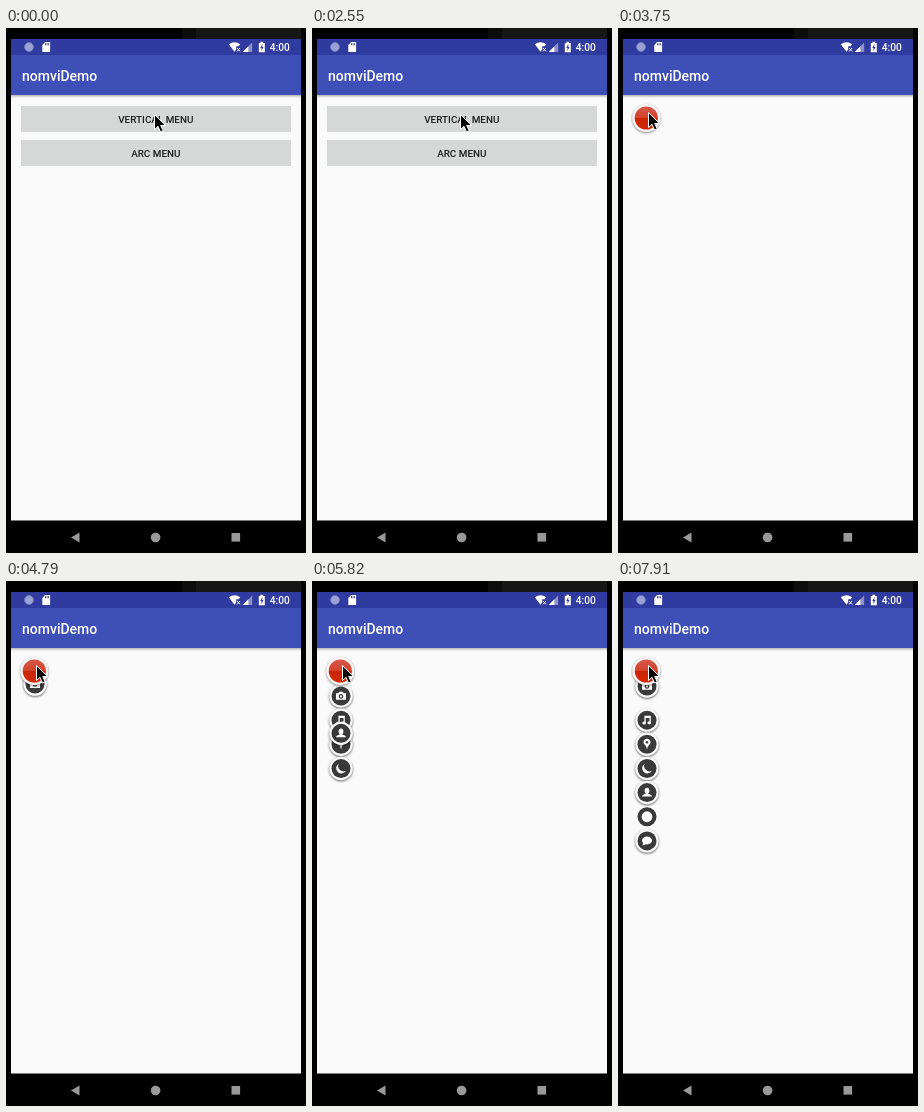
Write an HTML page that moves like this. It is 300 px wide and 525 px high and loops after 8000 ms.

```html
<!DOCTYPE html>
<html lang="en">
<head>
<meta charset="utf-8">
<title>Menu demo</title>
<style>
html, body { margin: 0; width: 100%; height: 100%; overflow: hidden; background: #000; }
svg { display: block; width: 300px; height: 525px; }
text { font: 500 9.9px Roboto, Arial, sans-serif; }
.btn { fill: #d6d7d7; filter: drop-shadow(0 .8px .7px #0006); }
.raised { filter: drop-shadow(0 1px 1px #0007); }
.item { filter: drop-shadow(0 1px 1.2px #0009); }
</style>
</head>
<body>
<svg viewBox="0 0 300 525">
  <defs>
    <linearGradient id="red" x2="0" y2="1">
      <stop offset="0" stop-color="#d6584b"/>
      <stop offset=".48" stop-color="#d2432c"/>
      <stop offset=".52" stop-color="#c92605"/>
      <stop offset="1" stop-color="#d32a08"/>
    </linearGradient>
    <linearGradient id="shade" x2="0" y2="1">
      <stop offset="0" stop-opacity=".28"/>
      <stop offset="1" stop-opacity="0"/>
    </linearGradient>
    <clipPath id="screen"><path d="M5 11h290v514H5z"/></clipPath>
  </defs>

  <path fill="#0c0c0c" d="M176 0h14v11h-14z"/>
  <path fill="#161616" d="M190 0h105v11H190z"/>

  <g fill="#999">
    <path d="M65 509.5l8.5-5v10z"/>
    <circle cx="149.6" cy="509.5" r="4.8"/>
    <path d="M225.5 505h8.6v8.6h-8.6z"/>
  </g>

  <g clip-path="url(#screen)">
    <path fill="#303b9f" d="M5 11h290v24H5z"/>
    <g id="page">
      <path id="paper" fill="#fafafa" d="M5 67h290v425.5H5z"/>
      <path fill="#3f4fb8" d="M5 27h290v40H5z"/>
      <path fill="url(#shade)" d="M5 67h290v3H5z"/>
      <text x="16" y="53" fill="#fff" style="font-size:14px">nomviDemo</text>

      <g id="home" text-anchor="middle" fill="#1d1d1d">
        <rect id="press" class="btn" x="15" y="78" width="270" height="26" rx="1.4"/>
        <rect class="btn" x="15" y="112" width="270" height="26" rx="1.4"/>
        <text x="149.8" y="95">VERTICAL MENU</text>
        <text x="149.8" y="129">ARC MENU</text>
      </g>

      <g id="menu">
        <g id="items"></g>
        <g class="raised">
          <circle cx="28.3" cy="90" r="14" fill="#f8f4f3"/>
          <circle cx="28.3" cy="90" r="11.6" fill="url(#red)"/>
        </g>
      </g>
    </g>

    <g fill="#fff">
      <circle cx="23" cy="19" r="4.4" fill="#9aa3d6" stroke="#7480c4"/>
      <path d="M36.3 17l2.8-2.9h5V24h-7.8z"/>
      <path fill="#303b9f" d="M39 15.3h.9v2H39zM40.6 15.3h.9v2h-.9zM42.2 15.3h.9v2h-.9z"/>
      <path d="M222.8 16.2q5.7-4 11.4 0l-1.6 2.1h-2.4v3l-1.7 2.4z"/>
      <path d="M231 20l3 3.4M234 20l-3 3.4" stroke="#fff"/>
      <path opacity=".45" d="M236.8 24l9.4-9.6V24z"/>
      <path d="M236.8 24l5.6-5.7V24z"/>
      <path d="M252.8 15h1.7v-1.2h2.6V15h1.7v9.2h-6z"/>
      <path fill="#303b9f" d="M256.3 16l-2 4h1.2v3l2-4h-1.2z"/>
      <text x="263.8" y="23" style="font-size:10.2px">4:00</text>
    </g>
  </g>

  <path id="cursor" stroke="#fff" stroke-width="1" d="M0 0v15l3.5-3.2 2.5 5.7 2.7-1.2-2.5-5.3h4.9z"/>
</svg>

<script>
const $ = id => document.getElementById(id);
const LOOP = 8000, TOP = 90, FIRST = 115, GAP = 24.15;
const OPEN = 4430, CLOSE = 7727, STAGGER = 294, MOVE = 420;

// White glyphs centred on 0,0
const icons = [
  '<path d="M-5-2.7h2.4l1-1.5h3.2l1 1.5H5v6.5H-5z"/><circle cy=".4" r="2.3" fill="#3a3a3a"/><circle cy=".4" r="1.1"/>',
  '<path d="M-2.6-4.4h6.4v6.8h-1.3v-4.6h-3.8v5h-1.3z"/><ellipse cx="-2.9" cy="2.9" rx="1.8" ry="1.5"/><ellipse cx="2.2" cy="2.5" rx="1.8" ry="1.5"/>',
  '<path d="M0 5.2C-1-.1-3.5.3-3.5-2.1a3.5 3.5 0 0 1 7 0C3.5.3 1-.1 0 5.2z"/><circle cy="-2" r="1.3" fill="#3a3a3a"/>',
  '<path d="M-2.4-4.8A5.3 5.3 0 1 0 5 2.4 5.5 5.5 0 0 1-2.4-4.8z"/>',
  '<ellipse cy="-1.8" rx="2.4" ry="3"/><path d="M-1.2 0h2.4v1.3q3.8.5 3.8 2.7H-5q0-2.2 3.8-2.7z"/>',
  '<circle r="5.4"/>',
  '<ellipse cy="-.4" rx="5" ry="3.9"/><path d="M-3.8 1.5l-.7 3.1 4-1.5z"/>'
];
$('items').innerHTML = icons.map((icon, i) => {
  const plain = i === 5;
  return `<g class="${plain ? '' : 'item'}" fill="#fff">
    <circle r="11.7" fill="${plain ? 'none' : '#fafafa'}"/>
    <circle r="9.5" fill="#3a3a3a"/>${icon}</g>`;
}).join('');
const items = [...$('items').children];

const clamp = x => Math.min(1, Math.max(0, x));
const ease = x => (1 - Math.cos(Math.PI * clamp(x))) / 2;
const show = (el, on) => el.style.display = on ? '' : 'none';
const step = (t, from, size) => from + Math.floor((t - from) / size) * size;

const tick = t => t < 4500 ? step(t, 0, 150)
  : t < 6710 ? step(t, 4500, 146.6) : step(t, 6710, 150);

function draw(t) {
  const opened = t >= 2850, entering = opened && t < 3000;
  show($('home'), !opened);
  show($('menu'), opened);
  $('page').setAttribute('transform', `translate(0 ${entering ? 2.7 : 0})`);
  $('paper').setAttribute('fill', entering ? '#f9f9f9' : '#fafafa');

  const press = t < 2550 ? clamp((t - 1350) / 600) : 0;
  const grey = 214 - 9 * clamp((t - 1500) / 450) * (press > 0);
  $('press').style.fill = `rgb(${grey},${grey + 1},${grey + 1})`;
  $('press').style.filter = `drop-shadow(0 ${.8 + .6 * press}px ${.7 + .5 * press}px #0006)`;

  const go = clamp((t - 3150) / 600);
  const x = 148.5 - 118 * go, y = 86.5 - 2 * go - 20 * go * (1 - go);
  $('cursor').setAttribute('transform', `translate(${x} ${y})`);

  items.forEach((item, i) => {
    const out = ease((t - OPEN - i * STAGGER) / MOVE);
    const back = ease((t - CLOSE - i * STAGGER) / MOVE);
    const p = out - back;
    show(item, p > 0);
    item.setAttribute('transform', `translate(29 ${TOP + (FIRST + i * GAP - TOP) * p})`);
  });
}

const start = performance.now();
function frame() {
  draw(tick((performance.now() - start) % LOOP));
  requestAnimationFrame(frame);
}
frame();
</script>
</body>
</html>
```
